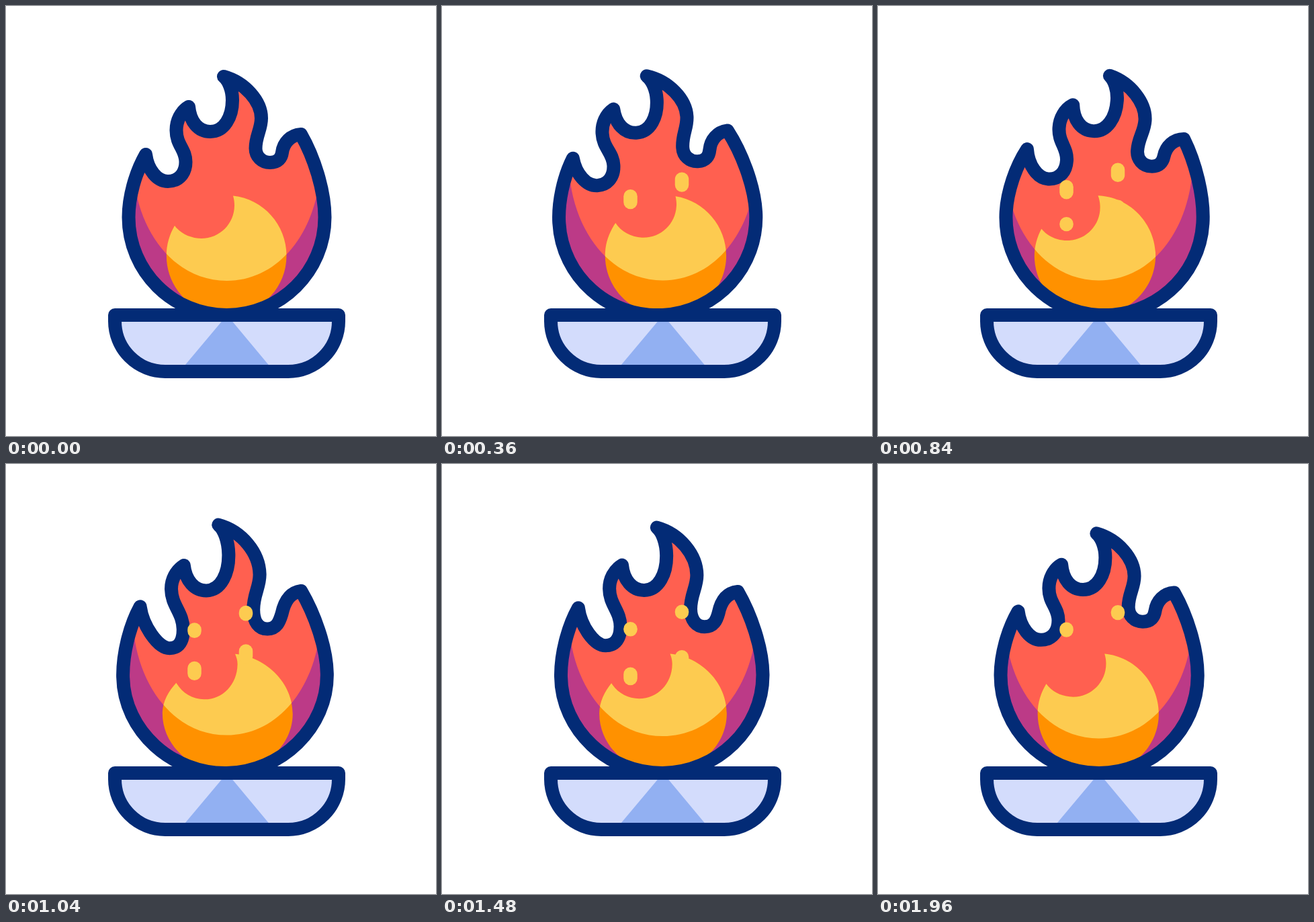
Recreate the animation shown at these times as an HTML page. Size 640 by 640 pixels, loop 2 s.

```html
<!DOCTYPE html>
<html lang="en">
<head>
<meta charset="utf-8">
<title>Fire bowl</title>
<style>
  html, body { margin: 0; width: 100%; height: 100%; overflow: hidden; background: #fff; }
  svg { display: block; width: 100%; height: 100%; }
  .line { fill: none; stroke: #032b76; stroke-width: 20; stroke-linejoin: round; }
  .spark { stroke: #fdcb50; stroke-width: 20.5; stroke-linecap: round; }
</style>
</head>
<body>
<svg viewBox="0 0 640 640">
  <defs>
    <clipPath id="inFlame"><path class="flame"/></clipPath>
    <clipPath id="inLight"><path class="light"/></clipPath>
  </defs>

  <g clip-path="url(#inFlame)">
    <rect width="640" height="640" fill="#bc3a87"/>
    <path class="light" fill="#ff6050"/>
    <path class="core" fill="#ff9100"/>
    <g clip-path="url(#inLight)"><path class="core" fill="#fdcb50"/></g>
  </g>
  <path class="flame line"/>
  <g id="sparks"></g>

  <path d="M162 460H495V469A75 75 0 0 1 420 544H237A75 75 0 0 1 162 469Z" fill="#d3dcfc"/>
  <path d="M329 460L399 544H258.500Z" fill="#92b0f2"/>
  <path class="line" d="M162 460H495V469A75 75 0 0 1 420 544H237A75 75 0 0 1 162 469Z"/>
</svg>
<script>
const LOOP = 2000, STEP = 40, PIVOT = '328.5 460', TILT = 4;
const SPARK_LIFE = 700, SPARK_STARTS = [0, 400, 800, 1300];

// Each shape is blended between a low and a tall pose.
const SHAPES = {
  flame: [
    `M328.5 460C248 460 182.5 395 182.5 314.5C182.5 285 192 249 208 221
     C211 244 225 261 241 261C258 261 267.5 248 267.5 232
     C267.5 213 253.5 207 253.5 185C253.5 171 260 157 272 150
     C274 172 286 187 304 187C325 187 337 165 337 140
     C337 124 331 111 324 105C356 114 380 142 380 167
     C380 184 371.5 193 371.5 212C371.5 224 381 233 393 233
     C405 233 410 226 411 218C413 203 424 192 439 191
     C458 224 474.5 274 474.5 314.5C474.5 395 409 460 328.5 460Z`,
    `M328.5 460C248 460 176 395 176 314.5C176 280 187 238 203.5 209
     C207 238 230 274 247.5 274C261 274 267.5 264 267.5 246
     C267.5 220 250.5 210 250.5 185C250.5 171 258 157 270 150
     C272 172 285 188 303 188C325 188 337 162 337 134
     C337 114 331 96 322.5 89C357 99 383 132 383 165
     C383 184 372.5 196 372.5 219C372.5 237 380 248 393 248
     C407 248 411 237 415 225C420 205 428 193 444.5 191
     C463 224 481 274 481 314.5C481 395 409 460 328.5 460Z`
  ],
  core: [
    `M338 282.5C383 287 417.5 326 417.5 371.5C417.5 421 377.5 460.5 328 460.5
     C278.5 460.5 238.8 421 238.8 371.5C238.8 355 243.5 340 251 327
     C260 339 275 346 291 346C318 346 340 324 340 297C340 292 339.5 287.5 338 282.5Z`,
    `M338 282.5C387 287 426 326 426 371.5C426 421 377.5 460.5 328 460.5
     C278.5 460.5 230.5 421 230.5 371.5C230.5 355 240 339 251 327
     C260 342 275 351.5 293 351.5C320 351.5 342 329 342 298C342 292 340 287 338 282.5Z`
  ],
  light: [
    'M183.500 40L188.500 240C194.500 340 253.500 409 328.500 409C403.500 409 462.500 340 468.500 240L473.500 40Z',
    'M183.500 34L188.500 234C194.500 334 253.500 403 328.500 403C403.500 403 462.500 334 468.500 234L473.500 34Z'
  ]
};

const all = selector => document.querySelectorAll(selector);
const ease = p => (1 - Math.cos(Math.PI * Math.min(1, Math.max(0, p)))) / 2;

function blend([low, tall], k) {
  const ends = tall.match(/[\d.]+/g);
  let i = 0;
  return low.replace(/[\d.]+/g, n => (+n + (ends[i++] - n) * k).toFixed(2));
}

// From rest to the left, to and fro, and back to rest.
function sway(t) {
  if (t < 250) return -ease(t / 250);
  if (t > 1750) return 1 - ease((t - 1750) / 250);
  return -Math.cos(2 * Math.PI * (t - 250) / 1000);
}

const sparks = [[280.5, 325], [357, 299.5]].flatMap(([x, y]) =>
  SPARK_STARTS.map(start => {
    const line = document.createElementNS('http://www.w3.org/2000/svg', 'line');
    line.setAttribute('class', 'spark');
    line.setAttribute('x1', x);
    line.setAttribute('x2', x);
    document.getElementById('sparks').append(line);
    return { line, y, start };
  }));

function draw(t) {
  const height = (1 - Math.cos(2 * Math.PI * t / 400)) / 2;
  const angle = TILT * sway(t);
  const turns = { flame: angle, core: -angle, light: 0 };

  for (const name in SHAPES) {
    const d = blend(SHAPES[name], height);
    for (const path of all('.' + name)) {
      path.setAttribute('d', d);
      path.setAttribute('transform', `rotate(${turns[name]} ${PIVOT})`);
    }
  }

  for (const { line, y, start } of sparks) {
    const age = t - start;
    const alive = age > 0 && age < SPARK_LIFE;
    line.setAttribute('visibility', alive ? 'visible' : 'hidden');
    line.setAttribute('y1', y - 80 * ease(age / SPARK_LIFE));
    line.setAttribute('y2', y + 0.01 - 80 * ease((age - 60) / 675));
  }
}

function tick() {
  draw(Math.floor(performance.now() % LOOP / STEP) * STEP);
  requestAnimationFrame(tick);
}
tick();
</script>
</body>
</html>
```
